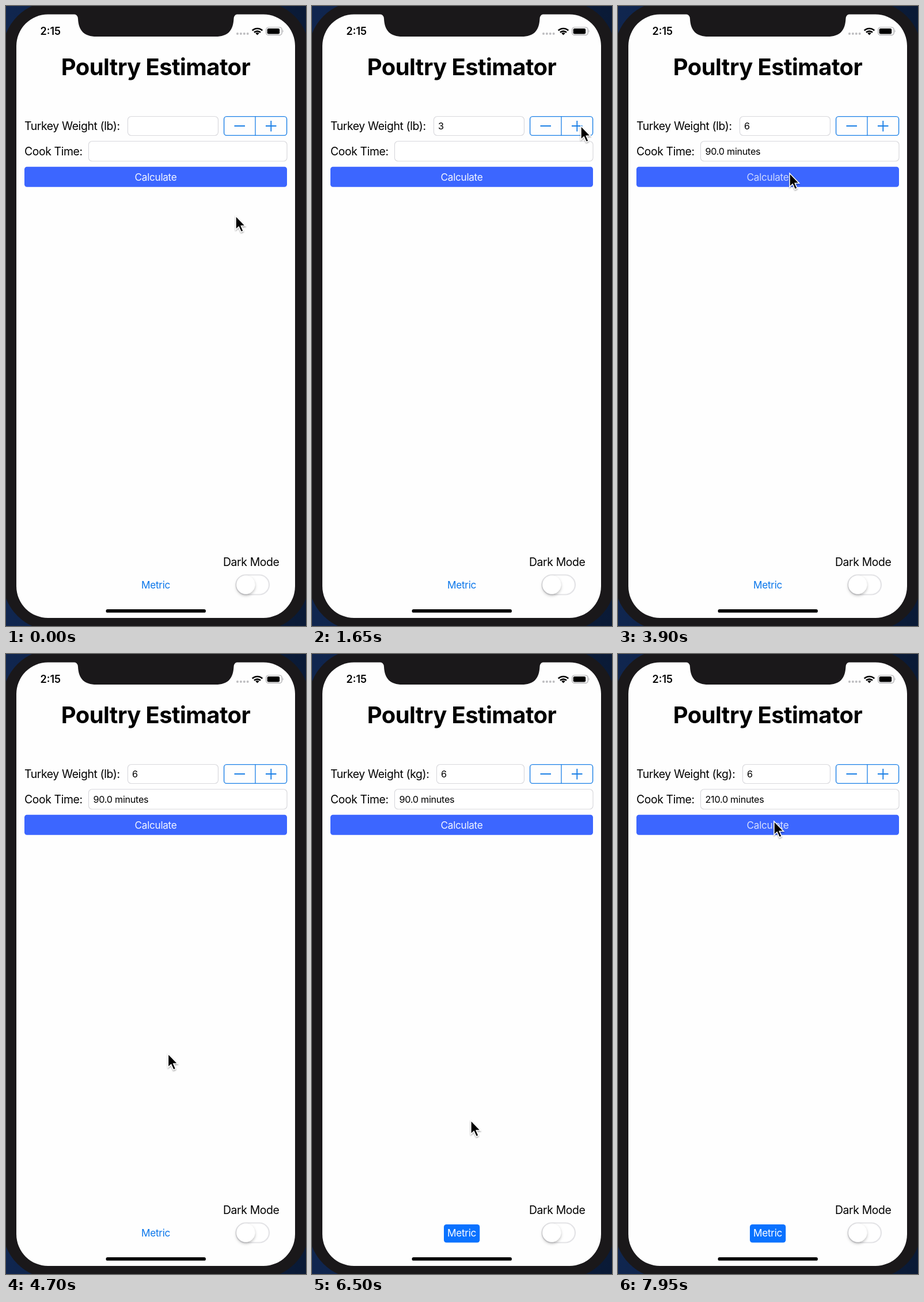
Animation of 521x1075 px, one loop 8 s. Source, as an HTML page:

```html
<!DOCTYPE html>
<html lang="en">
<head>
<meta charset="utf-8">
<title>Poultry Estimator</title>
<style>
html, body { margin: 0; width: 100%; height: 100%; overflow: hidden; background: #0b1c3c; }
svg { display: block; }
text { font-family: Inter, Roboto, sans-serif; letter-spacing: -.02em; }
.label { font-size: 19.4px; }
.value { font-size: 16.3px; }
.btn { font-size: 17.3px; text-anchor: middle; }
.field { fill: #fff; stroke: #d9d9dd; stroke-width: 1.2; }
.blue { fill: none; stroke: #1a7fe6; }
</style>
</head>
<body>
<svg width="521" height="1075" viewBox="0 0 521 1075">
  <defs>
    <linearGradient id="sky"><stop stop-color="#10264f"/><stop offset="1" stop-color="#0a1a36"/></linearGradient>
    <filter id="soft" x="-50%" y="-50%" width="200%" height="200%">
      <feDropShadow dx="0" dy="2.5" stdDeviation="2.5" flood-opacity=".28"/>
    </filter>
    <filter id="shade" x="-50%" y="-50%" width="200%" height="200%">
      <feDropShadow dx="0" dy="1.5" stdDeviation="1.3" flood-opacity=".4"/>
    </filter>
  </defs>

  <!-- phone -->
  <rect width="521" height="1075" fill="url(#sky)"/>
  <rect x="-6" y="-8" width="533" height="1091" rx="88" fill="#1a181a"/>
  <rect x="18" y="14.5" width="484" height="1046.5" rx="55" fill="#fefefe"/>
  <path d="M117 13.5Q124.5 14.5 125 22C126 43 136 53 157 53H364C385 53 394.500 43 395.500 22Q396 14.500 403 13.500Z" fill="#1a181a"/>
  <rect x="173.500" y="1046" width="173.500" height="5.800" rx="2.900"/>

  <!-- status bar -->
  <text x="59.500" y="50" font-size="18" font-weight="600" style="letter-spacing:0">2:15</text>
  <path d="M402 48H421" stroke="#bdbdc0" stroke-width="4" stroke-linecap="round" stroke-dasharray="0 5.900"/>
  <g fill="none" stroke="#000" stroke-width="2.700">
    <path d="M427.800 42.500A12.500 12.500 0 0 1 445.200 42.500"/>
    <path d="M431 45.800A8 8 0 0 1 442 45.800"/>
  </g>
  <path d="M433.300 47.200A4.600 4.600 0 0 1 439.700 47.200L436.500 50.500Z"/>
  <rect x="451.800" y="37" width="27.400" height="13.400" rx="4" fill="none" stroke="#a5a5a8" stroke-width="1.200"/>
  <rect x="453.700" y="38.900" width="21.500" height="9.600" rx="2.300"/>
  <path d="M480.700 41.500Q482.600 43.700 480.700 46Z" fill="#a5a5a8"/>

  <text x="260" y="119.500" font-size="40" font-weight="700" text-anchor="middle" style="letter-spacing:-.015em">Poultry Estimator</text>

  <!-- form -->
  <text id="unit" class="label" x="32" y="215"></text>
  <rect id="box" class="field" y="191.500" height="33" rx="6"/>
  <text id="weight" class="value" y="214"></text>

  <path id="plus" d="M433 192H483Q487.500 192 487.500 196V220Q487.500 224 483 224H433Z" fill="#d2e5fb"/>
  <rect class="blue" x="378.600" y="191.600" width="109" height="32.800" rx="4.500" stroke-width="1.400"/>
  <path class="blue" d="M433 192V224" stroke-width="1.300"/>
  <path class="blue" d="M396.500 208H415M451 208H469.500M460.300 199V217.500" stroke-width="1.900"/>

  <text class="label" x="32" y="259">Cook Time:</text>
  <rect class="field" x="143.500" y="234.500" width="344.500" height="34.500" rx="6"/>
  <text id="time" class="value" x="151.500" y="257.500"></text>

  <rect x="32" y="278.800" width="456" height="35" rx="4.500" fill="#3c66ff"/>
  <text id="calc" class="btn" x="260" y="303" fill="#fff">Calculate</text>

  <!-- footer -->
  <rect id="pill" x="229" y="989" width="62.300" height="31.500" rx="4.500" fill="#0a72ff"/>
  <text id="metric" class="btn" x="260" y="1010.300">Metric</text>
  <text class="label" x="377" y="971">Dark Mode</text>
  <rect x="399.500" y="986.500" width="57.500" height="34" rx="17" fill="#fff" stroke="#e3e3e6" stroke-width="2.200"/>
  <circle cx="416.300" cy="1003.500" r="16" fill="#fff" filter="url(#soft)"/>

  <path id="cursor" d="M0 0V23.500L5.200 18.700L9.300 27.800L13.200 26.100L9.300 17.200H16.600Z"
    stroke="#fff" stroke-width="1.500" filter="url(#shade)"/>
</svg>
<script>
const $ = id => document.getElementById(id);
const LOOP = 8000;
const taps = [750, 1120, 1480, 2000, 2520, 2880];
const firstCalc = 3720, switchUnit = 5230, secondCalc = 7700;

// start, end, from, bend, to
const moves = [
  [50, 600, [399, 364], [430, 285], [467, 208]],
  [3050, 3560, [467, 208], [385, 250], [298, 290]],
  [4300, 5030, [298, 290], [285, 640], [267, 999]],
  [6150, 7180, [267, 999], [289, 644], [271, 290]]
];

const clamp = v => Math.max(0, Math.min(1, v));
const ramp = (t, a, b) => clamp((t - a) / (b - a));
const ease = p => p * p * (3 - 2 * p);

function cursorAt(t) {
  const m = moves.filter(m => t >= m[0]).pop() || moves[0];
  const [start, end, a, b, c] = m;
  const s = ease(ramp(t, start, end)), r = 1 - s;
  return a.map((v, i) => r * r * v + 2 * r * s * b[i] + s * s * c[i]);
}

// Button label dims on press, then recovers
const dim = (t, at) => t < at ? 0 : ramp(t, at, at + 60) * (1 - ramp(t, at + 180, at + 480));

function draw(t) {
  const metric = t >= switchUnit;
  const left = metric ? 216.5 : 211.5;
  $('unit').textContent = `Turkey Weight (${metric ? 'kg' : 'lb'}):`;
  $('box').setAttribute('x', left);
  $('box').setAttribute('width', 368.5 - left);
  $('weight').setAttribute('x', left + 7.5);
  $('weight').textContent = taps.filter(at => t >= at).length || '';
  $('plus').style.opacity = taps.some(at => t >= at && t < at + 130) ? 1 : 0;

  $('time').textContent = t >= secondCalc + 60 ? '210.0 minutes' : t >= firstCalc + 60 ? '90.0 minutes' : '';
  $('calc').style.opacity = .94 - .2 * Math.max(dim(t, firstCalc), dim(t, secondCalc));

  const shown = ramp(t, switchUnit + 100, switchUnit + 420);
  $('pill').style.opacity = metric ? .84 + .16 * shown : 0;
  $('metric').style.fill = metric ? '#fff' : '#0a76ea';
  $('metric').style.opacity = metric ? .28 + .72 * shown : 1;

  $('cursor').setAttribute('transform', `translate(${cursorAt(t)})`);
}

let begin;
function tick(now) {
  begin ??= now;
  draw((now - begin) % LOOP);
  requestAnimationFrame(tick);
}
draw(0);
requestAnimationFrame(tick);
</script>
</body>
</html>
```
